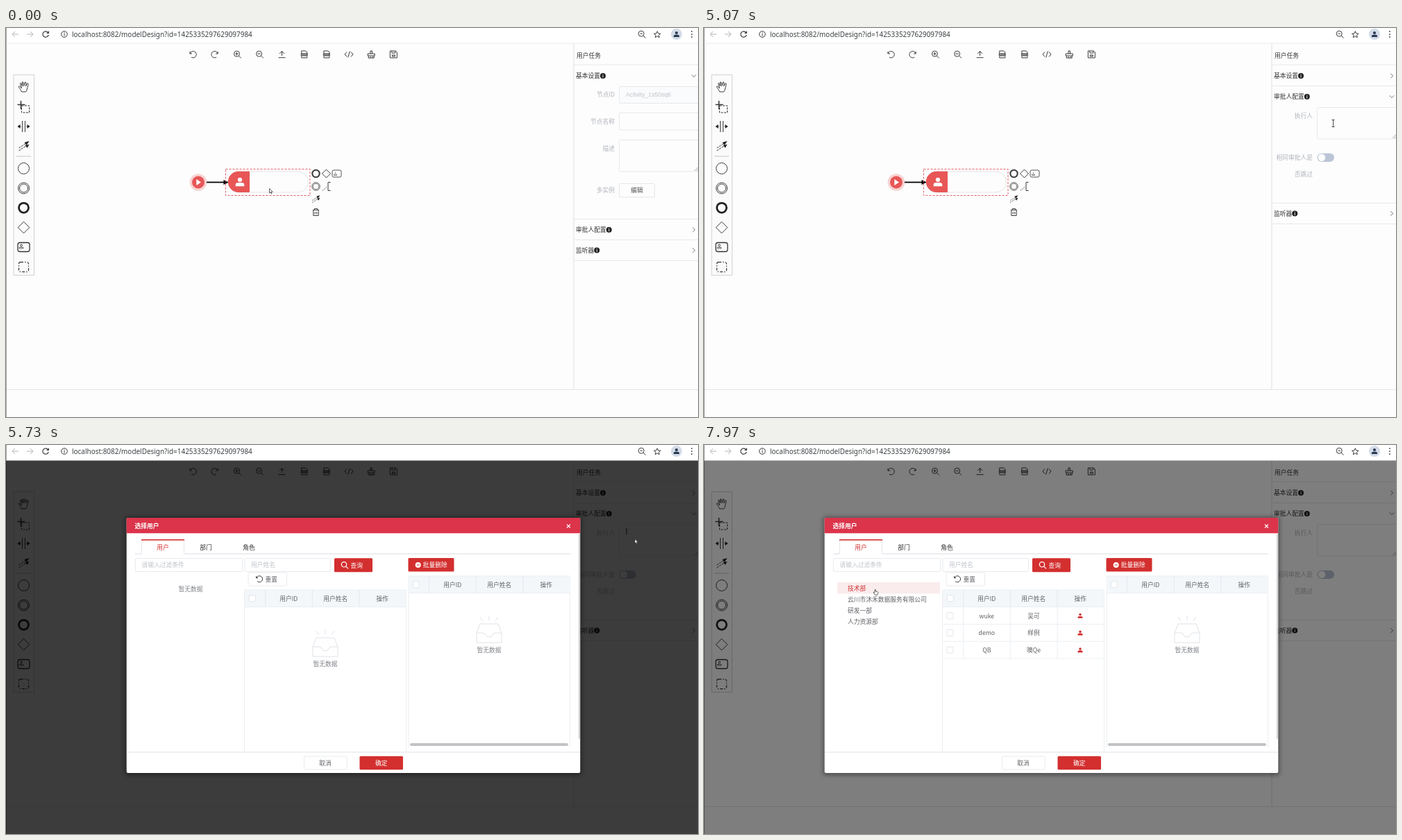
An HTML page that plays this animation: 997x561 px, repeating every 8000 ms.

```html
<!DOCTYPE html>
<html lang="zh-CN">
<head>
<meta charset="utf-8">
<style>
  html, body { margin: 0; width: 100%; height: 100%; overflow: hidden; background: #fdfdfd; }
  svg { display: block; width: 100vw; height: 100vh; }
  text { font: 8.75px "Noto Sans CJK SC", "Noto Sans CJK", "Noto Sans", sans-serif; fill: #606266; white-space: pre; }
  .line { fill: none; stroke: #3a3a3a; stroke-width: 1; }
</style>
</head>
<body>
<svg id="stage" viewBox="0 0 997 561" xmlns="http://www.w3.org/2000/svg"></svg>
<script>
const RED = '#d32f2f', GRAY = '#b2b5bc', PALE = '#e6e8ec', DARK = '#303133';

// Markup helpers
const at = (x, y, body, attrs = '') => `<g transform="translate(${x} ${y})" ${attrs}>${body}</g>`;
const path = (d, attrs = '') => `<path class="line" d="${d}" ${attrs}/>`;
const solid = (d, fill) => `<path d="${d}" fill="${fill}"/>`;
const circle = (x, y, r, attrs = 'class="line"') => `<circle cx="${x}" cy="${y}" r="${r}" ${attrs}/>`;
const rect = (x, y, w, h, fill = 'none', stroke = 'none', r = 0, attrs = '') =>
  `<rect x="${x}" y="${y}" width="${w}" height="${h}" rx="${r}" fill="${fill}" stroke="${stroke}" ${attrs}/>`;
const text = (x, cy, str, fill = '#606266', anchor = 'start', css = '') =>
  `<text x="${x}" y="${cy + 3.3}" text-anchor="${anchor}" style="fill:${fill};${css}">${str}</text>`;
const mid = (x, cy, str, fill, css) => text(x, cy, str, fill, 'middle', css);
const label = (cy, str) => text(877, cy, str, GRAY, 'end');
const hline = (x1, x2, y, color = PALE) => path(`M${x1} ${y}H${x2}`, `style="stroke:${color}"`);
const vline = (x, y1, y2, color = PALE) => path(`M${x} ${y1}V${y2}`, `style="stroke:${color}"`);
const diamond = (r, attrs) => path(`M0 ${-r}L${r} 0 0 ${r} ${-r} 0Z`, attrs);
const person = (s, fill) => `<g transform="scale(${s})" fill="${fill}">${circle(0, -3, 3, '')}<path d="M-6 6V4Q-6 1-2.5 1H2.5Q6 1 6 4V6Z"/></g>`;
const lens = sign => circle(-.8, -.8, 4) + path('M2.3 2.3L5.5 5.5') + path(sign);
const linkArrows = path('M-7 3L4-4M-7 7L5-1', 'stroke-dasharray="3 1.2"') +
  solid('M8-7L1-5 4-1ZM8-2L2-1 5 3Z', '#222');

function chrome() {
  const dots = [-4, 0, 4].map(y => circle(988, 9 + y, 1, 'fill="#555"')).join('');
  return rect(0, 0, 997, 22, '#fff') + hline(0, 997, 22, '#ececec') +
    at(13, 9, path('M5 0H-4M0-4L-4 0 0 4', 'style="stroke:#b4b4b4"')) +
    at(35, 9, path('M-5 0H4M0-4L4 0 0 4', 'style="stroke:#b4b4b4"')) +
    at(57, 9, path('M3.5-2.5A4.2 4.2 0 1 0 4.2 1', 'style="stroke-width:1.2"') + solid('M5-5V-1H1Z', '#444')) +
    at(84, 9, circle(0, 0, 4.3) + path('M0-.8V2.5M0-2.8V-1.6')) +
    `<text x="95" y="12.6" style="font:9.95px 'Noto Sans',sans-serif;fill:#3c4043">localhost:8082/modelDesign?id=1425335297629097984</text>` +
    at(916, 9, lens('M-2.5-.8H1')) +
    at(938.3, 9.5, path('M0-4.8L1.4-1.6 4.8-1.3 2.2.9 3 4.2 0 2.4-3 4.2-2.2.9-4.8-1.3-1.4-1.6Z')) +
    circle(966, 9, 8, 'fill="#d3dbe8"') + at(966, 9, person(.68, '#27364f')) + dots;
}

function toolbar() {
  const doc = path('M-4-1V-5H2L4-3V-1M-4 3V5H4V3') + rect(-5, -1.5, 10, 4, '#555') +
    path('M-3.5.5H3.5', 'style="stroke:#ddd" stroke-dasharray="1.4 .7"');
  return [
    path('M-4-4V-1H-1M-4-1A4.7 4.7 0 1 1-2 4.2'),
    path('M4-4V-1H1M4-1A4.7 4.7 0 1 0 2 4.2'),
    lens('M-3-.8H1.4M-.8-3V1.4'),
    lens('M-3-.8H1.4'),
    path('M0 2V-4.5M-3.5-1L0-4.5 3.5-1M-5 4.7H5'),
    doc, doc,
    path('M-3-3.5L-6 0-3 3.5M3-3.5L6 0 3 3.5M1.3-4.5L-1.3 4.5'),
    path('M-1.2-1V-5H1.2V-1M-5-1H5V2H-5ZM-4 2V5.2H4V2M-1 5V3M2 5V3'),
    path('M-5-5H3L5-3V5H-5ZM-2.5-5V-2H2.5V-5M-2 1H2V3H-2Z')
  ].map((icon, i) => at(269 + i * 32.15, 38, icon)).join('');
}

function palette() {
  const hand = path('M-3 7C-4 4-8 0-7-1S-4 1-3 2L-5-5C-4-7-3-5-2-1L-2-7C-1-8 0-7 0-1L2-7C3-8 4-6 3-1L5-5C7-6 7-4 5 2Q5 5 3 7Z');
  return rect(11, 67.5, 29.5, 289, '#fbfbfb', '#d2d2d2') + hline(15, 36, 185, '#c4c4c4') + [
    [85, hand],
    [114, path('M-4-9V3M-9-3.5H2', 'style="stroke-width:1.6"') + rect(-3, -2, 11, 10, 'none', '#333', 0, 'stroke-dasharray="3 1.5"')],
    [142, path('M-2-8V8M2-8V8M-8 0H-4M8 0H4') + solid('M-9 0L-5-3V3ZM9 0L5-3V3Z', '#222')],
    [170, linkArrows],
    [202.5, circle(0, 0, 8)],
    [231, circle(0, 0, 8) + circle(0, 0, 6)],
    [259.3, circle(0, 0, 7, 'class="line" style="stroke:#222;stroke-width:2.8"')],
    [287.7, diamond(8.3)],
    [316, rect(-8.5, -6.5, 17, 13, 'none', '#333', 3, 'stroke-width="1.3"') + at(-3.5, -1, circle(0, -1.4, 1.5) + path('M-3 3V1.5H3V3Z', 'style="stroke-width:.7"'))],
    [344.7, rect(-7, -7, 14, 14, 'none', '#333', 2.5, 'stroke-width="1.2" stroke-dasharray="4 2 1.5 2"')]
  ].map(([y, icon]) => at(25.5, y, icon)).join('');
}

function diagram() {
  const pad = [
    [446.5, 210, circle(0, 0, 5.2, 'class="line" style="stroke-width:2"')],
    [461.5, 210, diamond(6)],
    [476.5, 210, rect(-6.5, -5, 13, 10, 'none', '#555', 2) + path('M-4 2.5V1H0V2.5ZM-2-2V0', 'style="stroke-width:.6"')],
    [446.5, 228.5, circle(0, 0, 5.8, 'class="line" style="stroke-width:.8"') + circle(0, 0, 4.3, 'class="line" style="stroke-width:.8"')],
    [462, 228.5, path('M5.5-6H2V6H5.5') + path('M-6 6L1 0', 'stroke-dasharray="1.5 1.5"')],
    [446.5, 246.5, `<g transform="scale(.75)">${linkArrows}</g>`],
    [446.5, 265.5, path('M-4.5-3H4.5M-2-3V-5H2V-3M-3.7-3V5H3.7V-3M-1.3-.5V3M1.3-.5V3')]
  ].map(([x, y, icon]) => at(x, y, icon)).join('');
  return circle(277, 222.5, 12.3, 'fill="#f8d3d3"') + circle(277, 222.5, 9, 'fill="#e85656"') +
    solid('M274.3 218V227L281 222.5Z', '#fff') +
    path('M289 222.5H315', 'style="stroke:#000;stroke-width:1.8"') + solid('M313.5 219L321 222.5 313.5 226Z', '#000') +
    rect(320.5, 207, 115, 30, '#fdfdfd', '#e4e4e6', 15) +
    solid('M351 206.7V237H335A15.1 15.1 0 0 1 335 206.7Z', '#e85656') + at(337, 222, person(1.05, '#fff')) +
    rect(316.5, 203.5, 121.5, 38, 'none', '#e5606a', 0, 'stroke-dasharray="3 2"') + pad;
}

function header(cy, title, id) {
  const x = 821 + title.length * 8.75 + 4;
  return text(821, cy, title, DARK) + circle(x, cy, 4, 'fill="#222"') +
    path(`M${x} ${cy - .7}V${cy + 2.3}M${x} ${cy - 2.4}V${cy - 1.4}`, 'style="stroke:#fff"') +
    at(991, cy, path('M-1.7-3.2L1.7 0-1.7 3.2', `id="${id}" style="stroke:#666;stroke-width:.9"`));
}

const grip = y => path(`M992 ${y}L997 ${y - 5}M995 ${y}L997 ${y - 2}`, 'style="stroke:#888;stroke-width:.7"');

function panel() {
  const basic = label(96, '节点ID') + rect(883.5, 84.5, 120, 24, '#fafbfc', PALE, 2) +
    `<text x="893" y="99" style="font:8.7px 'Liberation Sans',sans-serif;fill:#bfc3ca">Activity_1s50sq6</text>` +
    label(134.5, '节点名称') + rect(883.5, 122.5, 120, 24.5, '#fdfdfd', PALE, 2) +
    label(173.5, '描述') + rect(883.5, 161.5, 120, 45.5, '#fdfdfd', PALE, 2) + grip(206) +
    label(233.5, '多实例') + rect(883.5, 224.5, 51, 19.5, '#fdfdfd', '#e2e4e8', 2) +
    mid(909, 234, '编辑', '#555', 'font-weight:500') + hline(819, 997, 275.5);
  const approver = label(127, '执行人') + rect(883.5, 114.5, 120, 45.5, '#fdfdfd', PALE, 2) + grip(159) +
    label(186.5, '相同审批人是') + rect(883.5, 180.7, 24.5, 12.3, '#bcc5d6', 'none', 6.2) + circle(890, 186.8, 5.2, 'fill="#fff"') +
    label(211, '否跳过') + hline(819, 997, 252.5);
  return `<clipPath id="basicClip"><rect id="basicBox" x="819" y="83.8" width="178"/></clipPath>
    <clipPath id="approverClip"><rect id="approverBox" x="819" y="113.8" width="178"/></clipPath>` +
    vline(818, 22, 521, '#dcdfe2') + hline(0, 997, 521.5, '#e6e6e6') +
    text(822, 39.5, '用户任务', DARK) + hline(819, 997, 53) + header(69, '基本设置', 'basicChevron') +
    `<g id="basicLine">${hline(819, 997, 83.5)}</g><g clip-path="url(#basicClip)">${basic}</g>` +
    `<g id="approver">${header(99, '审批人配置', 'approverChevron')}<g id="approverLine">${hline(819, 997, 113.5)}</g>
      <g clip-path="url(#approverClip)">${approver}</g></g>` +
    `<g id="listener">${header(267.5, '监听器', 'listenerChevron')}${hline(819, 997, 282.5)}</g>` +
    `<g id="caret">${vline(894, 120, 129, '#222')}</g>`;
}

const box = (x, y) => rect(x - 4.5, y - 4.5, 9, 9, '#fff', '#e2e5ea', 1);
const button = (x, y, w, h, fill) => rect(x, y, w, h, fill, 'none', 1.5);
const outline = (x, y, w, h) => rect(x + .5, y + .5, w, h, '#fff', '#e8eaee', 1.5);

function tableHead(x, y) {
  return rect(x, y, 232.5, 24.5, '#f3f7fa') + hline(x, x + 232.5, y, '#ebeef3') + hline(x, x + 232.5, y + 24.5, '#ebeef3') +
    [29.7, 97.3, 165].map(dx => vline(x + dx, y, y + 24.5, '#e4e8ed')).join('') + box(x + 10.8, y + 12.3) +
    ['用户ID', '用户姓名', '操作'].map((s, i) => mid(x + 63.3 + i * 67.5, y + 12.6, s)).join('');
}

const emptyBox = (x, y) => at(x, y, path(
  'M-18 20V6L-13-7H13L18 6V20ZM-18 6H-8Q-6 6-5 9T0 12 5 9 8 6H18M0-12V-19M-9-11L-13-17M9-11L13-17',
  'style="stroke:#dfe2e8;stroke-width:1"') + mid(0, 31, '暂无数据', '#808389'));

function dialog() {
  const departments = ['技术部', '云川市沐禾数据服务有限公司', '研发一部', '人力资源部'];
  const users = [['wuke', '吴可'], ['demo', '样例'], ['QB', '噢Qe']];
  const list = departments.map((s, i) => i ? text(207, 206.5 + i * 16, s) : '').join('');
  const rows = users.map(([id, name], i) => {
    const y = 246.3 + i * 24.7;
    return hline(344, 576, y + 12.2, '#ebeef3') + [373.7, 441.3, 509].map(x => vline(x, y - 12, y + 12, '#ebeef3')).join('') +
      box(354.5, y) + mid(407.3, y, id) + mid(475, y, name) + at(542, y, person(.58, RED));
  }).join('');
  return rect(172, 104, 657, 372, '#000', 'none', 3, 'opacity=".4" style="filter:blur(3px)"') +
    rect(173.7, 105, 653.6, 368, '#fff', 'none', 2) +
    solid('M173.7 127.3V107Q173.7 105 175.7 105H825.3Q827.3 105 827.3 107V127.3Z', '#db344b') +
    text(185.5, 116.3, '选择用户', '#fff', 'start', 'font-weight:700') +
    path('M808 114.5L813 119.5M813 114.5L808 119.5', 'style="stroke:#fff;stroke-width:1.1"') +
    hline(186, 813, 157, '#d9dce1') + rect(195, 137, 62, 21, '#fff') +
    path('M195.5 157V137M256.5 157V137', 'style="stroke:#e4e7ec"') + rect(195, 136, 62, 1.6, RED) +
    mid(226, 147.5, '用户', RED) + mid(288, 147.5, '部门', DARK) + mid(350, 147.5, '角色', DARK) +
    outline(186, 163, 154, 19) + text(195.5, 173, '请输入过滤条件', '#bfc3ca') +
    outline(343.5, 163, 123.5, 19) + text(353, 173, '用户姓名', '#bfc3ca') +
    button(473, 163.3, 55, 20, RED) +
    at(488, 173.3, path('M1.8 1.8L5 5', 'style="stroke:#fff;stroke-width:1.2"') + circle(-1, -1, 3.7, 'class="line" style="stroke:#fff;stroke-width:1.2"')) +
    text(496.5, 173.8, '查询', '#fff', 'start', 'font-weight:500') +
    outline(348.5, 183.5, 55.5, 19) + at(365, 193.3, path('M-4.5-4V-1.5H-2M-4.2-1.5A4.5 4.5 0 1 1-3 3.3')) + text(373.5, 193.8, '重置') +
    button(579.5, 163, 66, 19.5, RED) + circle(593.7, 173, 4, 'fill="#fff"') + hline(591.7, 595.7, 173, RED) +
    text(600.8, 173, '批量删除', '#fff', 'start', 'font-weight:500') +
    vline(343.5, 209, 443, '#eceef2') + vline(576.5, 209, 443, '#eceef2') + tableHead(344, 209) +
    vline(580, 189, 436, '#eceef2') + vline(812.5, 189, 436, '#eceef2') + tableHead(580, 189) +
    emptyBox(696, 265) + rect(582, 430, 228, 4, '#c1c3c6', 'none', 2) + rect(824.8, 128, 2.2, 296, '#d5d7da', 'none', 1) +
    `<g id="noDepartments">${mid(266, 208, '暂无数据', '#808389')}</g>
     <g id="departments"><rect id="hover" x="192" y="198" width="148" height="16.3" fill="#faecec"/>
       <g id="firstItem" fill="#606266"><text x="207" y="209.8" style="fill:inherit">${departments[0]}</text></g>${list}</g>
     <g id="noUsers">${emptyBox(460, 285)}</g><g id="users">${rows}</g>` +
    hline(174, 827, 443, '#dfe2e6') + outline(429, 448.5, 61.5, 19) + mid(460, 458.5, '取消') +
    button(509.5, 448.7, 62.5, 19.6, RED) + mid(540.7, 458.5, '确定', '#fff', 'font-weight:500');
}

const cursors = `<g id="cursor">
  <path id="arrow" d="M-2-3.5V3L-.5 1.7.6 4 1.6 3.5.6 1.3H2.6Z" fill="#fff" stroke="#222" stroke-width=".7"/>
  <path id="hand" d="M-1.2 4.2L-3.3.8Q-3.3-.4-1.4.8V-3.2Q-.8-4.5-.2-3.2V-1L2.4-.5Q3.4 0 3.2 1.5L2.3 4.2Z" fill="#fff" stroke="#222" stroke-width=".7"/>
  <path id="beam" d="M-2-5H2M0-5V5M-2 5H2" fill="none" stroke="#222" stroke-width=".8"/></g>`;

const stage = document.getElementById('stage');
stage.innerHTML = rect(0, 22, 997, 539, '#fdfdfd') + toolbar() + palette() + diagram() + panel() +
  vline(.5, 0, 561, '#a8a8a8') + `<rect id="mask" y="22" width="997" height="539"/><g id="dialog">${dialog()}</g>` + chrome() +
  vline(.5, 0, 22, '#a8a8a8') + cursors;

const el = {};
stage.querySelectorAll('[id]').forEach(node => el[node.id] = node);
const set = (id, name, value) => el[id].setAttribute(name, value);
const show = (id, on) => set(id, 'display', on ? 'inline' : 'none');
const move = (id, x, y) => set(id, 'transform', `translate(${x} ${y})`);

// Pointer positions: [tick, x, y]
const route = [
  [4, 381.5, 235], [5, 390, 241], [7, 452, 250], [9, 560, 249], [11, 660, 242], [12, 711, 240],
  [14, 783, 248], [16, 832, 268], [18, 859, 285], [20, 862.3, 284.5], [26, 862.3, 284.5],
  [28, 864, 262], [31, 884, 190], [33, 900, 150], [34, 905.5, 141], [35, 906.5, 137.5], [37, 908, 139],
  [41, 908, 139], [42, 894.5, 143.5], [44, 890, 144], [46, 800, 152], [48, 560, 176], [50, 325, 202],
  [51, 270, 208], [52, 249, 209], [53, 247.5, 212]
];

function pointerAt(tick) {
  const next = route.findIndex(p => p[0] > tick);
  if (next === 0) return route[0].slice(1);
  if (next < 0) return route[route.length - 1].slice(1);
  const [t0, x0, y0] = route[next - 1], [t1, x1, y1] = route[next];
  const u = (tick - t0) / (t1 - t0);
  return [x0 + (x1 - x0) * u, y0 + (y1 - y0) * u];
}

// Value of the last step reached: [time, value]
const stepped = (t, steps) => steps.reduce((value, [start, v]) => t >= start ? v : value, 0);
const smooth = u => { u = Math.min(1, Math.max(0, u)); return u * u * (3 - 2 * u); };

function draw(t) {
  const tick = Math.floor((t + 22) / 144.6); // the screen is refreshed about seven times a second

  const open = smooth((tick - 19.6) / 2.6);
  set('basicBox', 'height', 193 * (1 - open));
  set('approverBox', 'height', 140 * open);
  move('approver', 0, 192 * (1 - open));
  move('listener', 0, 53 * (1 - open));
  set('basicChevron', 'transform', `rotate(${90 * (1 - open)})`);
  set('approverChevron', 'transform', `rotate(${90 * open})`);
  show('basicLine', open > 0);
  show('approverLine', open < 1);

  show('caret', t >= 5330 && (t - 5250) % 1060 < 530);
  set('mask', 'opacity', stepped(t, [[5360, .25], [5490, .62], [5720, .76], [5900, .64], [6080, .5]]));
  set('dialog', 'opacity', stepped(t, [[5360, .27], [5490, .8], [5720, 1]]));
  move('dialog', 0, stepped(t, [[5360, -9.5], [5490, -3], [5720, 0]]));

  const loaded = t >= 5900, hovering = tick >= 51, filled = t >= 7800;
  show('noDepartments', !loaded);
  show('departments', loaded);
  show('hover', hovering);
  set('firstItem', 'fill', hovering ? RED : '#606266');
  show('noUsers', !filled);
  show('users', filled);

  const [x, y] = pointerAt(tick);
  const beam = tick >= 33 && tick < 37;
  const hand = hovering || (tick >= 17 && tick < 29);
  move('cursor', x, y);
  show('beam', beam);
  show('hand', hand);
  show('arrow', !beam && !hand);
}

const start = performance.now();
function frame() {
  draw((performance.now() - start) % 8000);
  requestAnimationFrame(frame);
}
frame();
</script>
</body>
</html>
```
